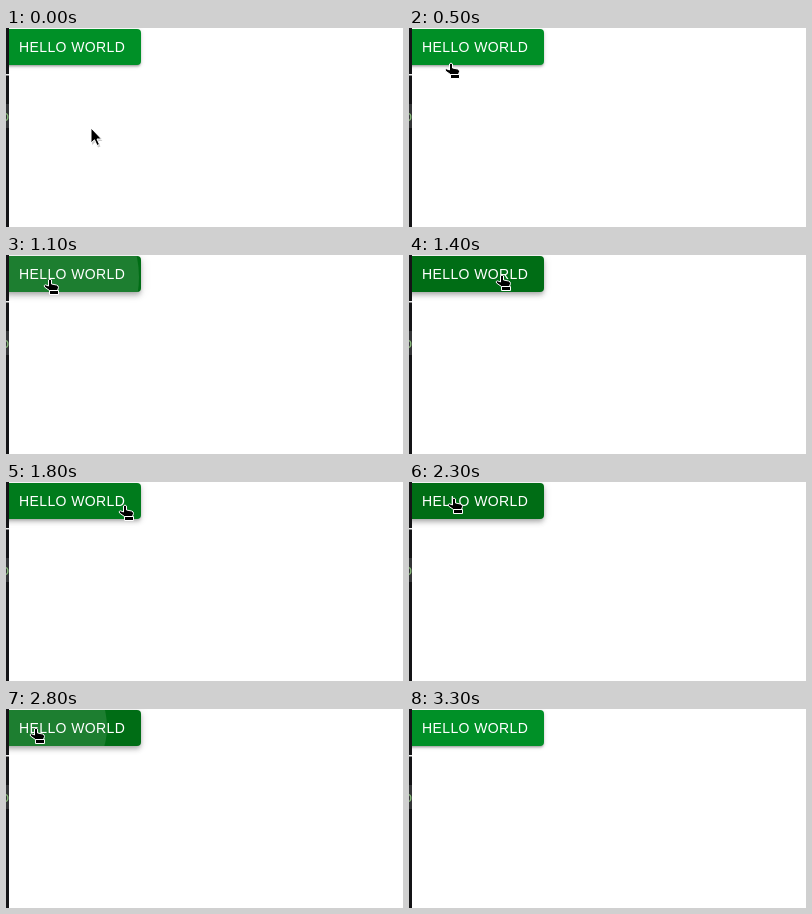
Recreate the animation shown at these times as an HTML page. Size 397 by 199 pixels, loop 3500 ms.

```html
<!DOCTYPE html>
<html lang="en">
<head>
<meta charset="utf-8">
<title>Ripple button</title>
<style>
  html, body { margin: 0; width: 100%; height: 100%; overflow: hidden; background: #fff; }
  #stage { position: relative; width: 397px; height: 199px; overflow: hidden; }
  #button {
    position: absolute; left: -3px; top: 1px; width: 138px; height: 36px;
    border-radius: 4px; overflow: hidden; color: #fff; white-space: nowrap;
    font: 14px/36px "Liberation Sans", Arial, sans-serif; letter-spacing: .02857em;
  }
  #button span { position: absolute; left: 16px; top: 0; }
  .ripple { position: absolute; border-radius: 50%; background: #fff; }
  svg { position: absolute; left: 0; top: 0; }
</style>
</head>
<body>
<div id="stage">
  <div id="button"><span>HELLO WORLD</span></div>
  <svg width="397" height="199" viewBox="0 0 397 199">
    <svg width="3" height="199">
      <rect width="3" height="199" fill="#141416"/>
      <rect y="46" width="3" height="1.5" fill="#eee"/>
      <rect y="76" width="3" height="24" fill="#333436"/>
      <text x="-5" y="93" fill="#86b878" font-size="14" font-family="DejaVu Sans Mono, monospace">o</text>
    </svg>
    <g id="arrow" stroke-linejoin="round">
      <path d="M1 2V17L4.5 13.8L7 19.5L9.5 18.4L7 13H11.5Z" opacity=".2"/>
      <path d="M0 0V15L3.5 11.8L6 17.5L8.5 16.4L6 11H10.5Z" stroke="#fff"/>
    </g>
    <g id="hand" stroke="#fff" stroke-linejoin="round">
      <path d="M-1.5 2Q0 0 1.5 2V6L6.5 7Q8.5 7.5 8.5 9.5L7.5 12.5H-.5L-5.5 9Q-6.5 7 -4.5 6.8L-1.5 8Z"/>
      <path d="M-.5 12.5H8.5V16.5H-.5Z"/>
    </g>
  </svg>
</div>
<script>
const LOOP = 3500, STEP = 100, LAST = 3300;
const $ = id => document.getElementById(id);
const button = $('button'), arrow = $('arrow'), hand = $('hand');
const lerp = (a, b, k) => a + (b - a) * k;
const clamp = x => Math.max(0, Math.min(1, x));
const smooth = x => x * x * (3 - 2 * x);

// cubic-bezier(.4, 0, .2, 1)
function ease(x) {
  x = clamp(x);
  let lo = 0, hi = 1;
  for (let i = 0; i < 24; i++) {
    const u = (lo + hi) / 2, v = 1 - u;
    if (1.2 * v * v * u + .6 * v * u * u + u ** 3 < x) lo = u; else hi = u;
  }
  return 3 * (1 - lo) * lo * lo + lo ** 3;
}

// 0 to 1 and back, with 250 ms transitions
const pulse = (t, on, off) => ease((t - on) / 250) - ease((t - off) / 250);

// Resting points and turns of the pointer
const path = [
  { t: 0, x: 85, y: 100 },
  { t: 650, x: 35, y: 24 },
  { t: 1000, x: 35, y: 24 },
  { t: 1400, x: 93, y: 19 },
  { t: 1600, x: 114, y: 44 },
  { t: 1800, x: 119, y: 22 },
  { t: 2300, x: 45, y: 15 },
  { t: 2500, x: 30, y: 18 },
  { t: 2900, x: 30, y: 18 },
  { t: 3200, x: 40, y: -24 },
  { t: LOOP, x: 40, y: -24 }
];

function pointerAt(t) {
  const i = path.findIndex(p => p.t > t), a = path[i - 1], b = path[i];
  const k = smooth((t - a.t) / (b.t - a.t));
  return [lerp(a.x, b.x, k), lerp(a.y, b.y, k)].map(Math.round);
}

function addRipple(x, y, radius, start, release) {
  const el = document.createElement('div');
  el.className = 'ripple';
  button.prepend(el);
  return t => {
    const grow = ease((t - start) / 550), fade = 1 - ease((t - release) / 550);
    const r = radius * grow;
    el.style.left = x - r + 'px';
    el.style.top = y - r + 'px';
    el.style.width = el.style.height = 2 * r + 'px';
    el.style.opacity = t < start ? 0 : lerp(.1, .3, grow) * fade;
  };
}
const ripples = [addRipple(37, 21, 103, 682, 880), addRipple(33, 17, 106, 2563, 2605)];

function drawButton(t) {
  const hover = pulse(t, 470, 1450) + pulse(t, 1700, 3040);
  const lift = 2 + 2 * hover + 4 * pulse(t, 800, 950);
  button.style.background = `rgb(0, ${lerp(144, 109, hover)}, ${lerp(39, 21, hover)})`;
  button.style.boxShadow = `0 2px ${lift}px -1px rgba(0,0,0,.2),
    0 ${lift}px ${lift * 1.25}px rgba(0,0,0,.14),
    0 1px ${lift * 2.5}px rgba(0,0,0,.12)`;
}

function place(el, x, y, shown) {
  el.setAttribute('transform', `translate(${x} ${y})`);
  el.setAttribute('visibility', shown ? 'visible' : 'hidden');
}

function draw(time) {
  const t = Math.min(LAST, Math.floor(time % LOOP / STEP) * STEP);
  drawButton(t);
  ripples.forEach(drawRipple => drawRipple(t));
  const [x, y] = pointerAt(t);
  const over = y >= 1 && y < 37 && x < 135;
  place(arrow, x, y, !over);
  place(hand, x, y, over);
}

const begin = performance.now();
function tick() {
  draw(performance.now() - begin);
  requestAnimationFrame(tick);
}
tick();
</script>
</body>
</html>
```
